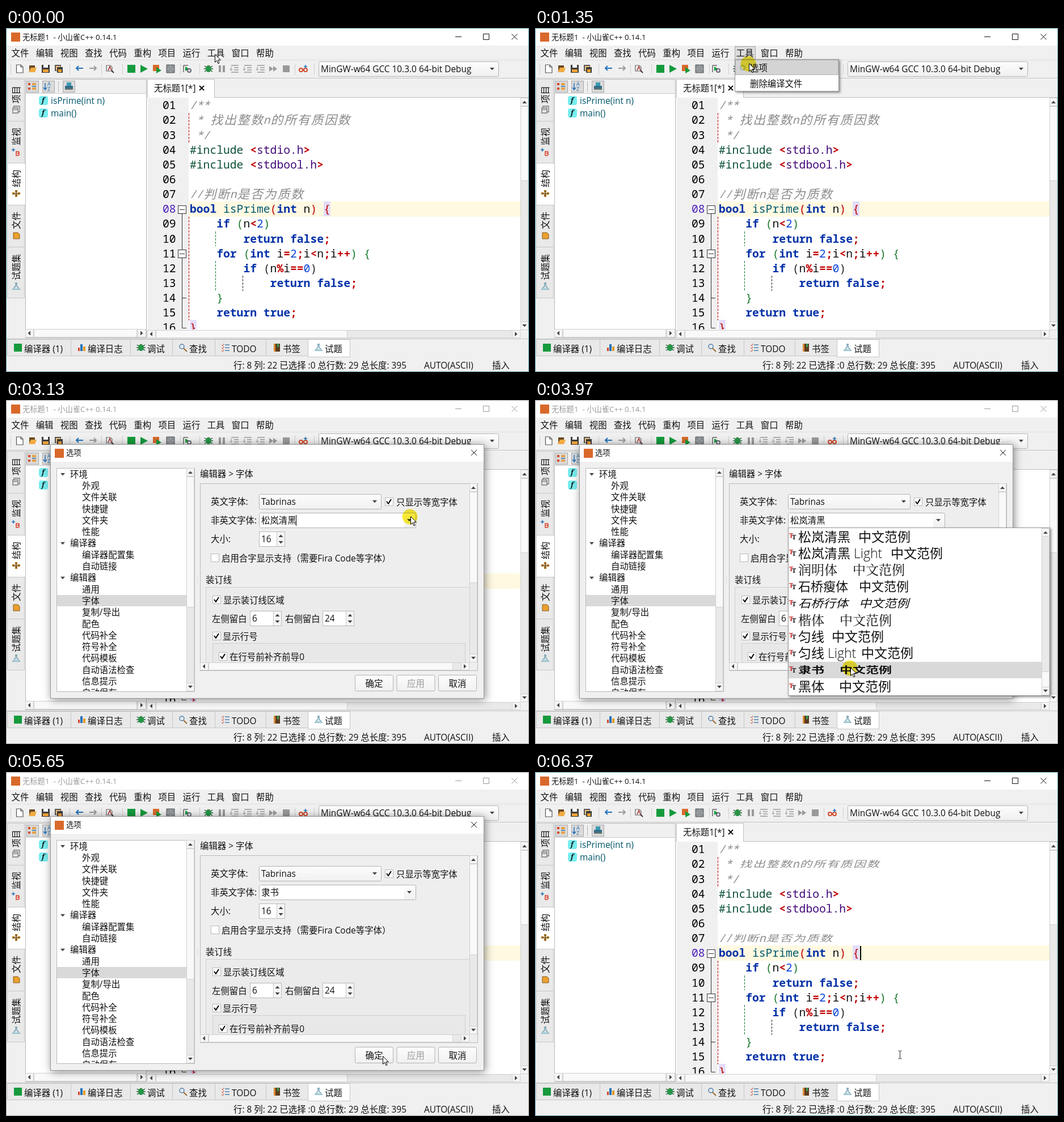
An HTML page with a canvas for the animation above (8440 ms loop, 922 by 607 pixels).

```html
<!DOCTYPE html>
<html lang="zh-CN">
<head>
<meta charset="utf-8">
<title>选项</title>
<style>
html, body { margin: 0; width: 100%; height: 100%; overflow: hidden; background: #f0f0f0; }
canvas { display: block; }
</style>
</head>
<body>
<canvas id="stage" width="922" height="607"></canvas>
<script>
const ctx = document.getElementById('stage').getContext('2d');
const LOOP = 8440;
const UI = '"Open Sans","Noto Sans CJK SC","Noto Sans CJK",sans-serif';
const MONO = '"Noto Sans Mono","Noto Sans CJK SC","Noto Sans CJK",monospace';
const SERIF = '"Noto Serif","Noto Serif CJK SC","Noto Sans CJK SC",serif';
const FACE = '#f0f0f0', EDGE = '#b9b9b9', INK = '#111', DIM = '#9a9a9a';
const ORANGE = '#d9692b', BLUE = '#2272b9', GREEN = '#159a3c';

// ---- drawing helpers ----
function fill(x, y, w, h, color) { ctx.fillStyle = color; ctx.fillRect(x, y, w, h); }
function frame(x, y, w, h, color = EDGE) {
  ctx.strokeStyle = color; ctx.lineWidth = 1;
  ctx.strokeRect(x + .5, y + .5, w - 1, h - 1);
}
function box(x, y, w, h, color = '#fff', edge = EDGE) { fill(x, y, w, h, color); frame(x, y, w, h, edge); }
function text(s, x, cy, { size = 15.4, color = INK, style = '', font = UI, align = 'left', squash = 1 } = {}) {
  ctx.save();
  ctx.translate(x, cy);
  ctx.scale(1, squash);
  ctx.font = `${style} ${size}px ${font}`;
  ctx.fillStyle = color;
  ctx.textAlign = align;
  ctx.fillText(s, 0, size * .37);
  ctx.restore();
}
// Each part is [path, color, line width]; without a width it is filled.
function shape(x, y, ...parts) {
  ctx.save();
  ctx.translate(x, y);
  for (const [d, color, width] of parts) {
    const path = new Path2D(d);
    if (width) { ctx.strokeStyle = color; ctx.lineWidth = width; ctx.stroke(path); }
    else { ctx.fillStyle = color; ctx.fill(path); }
  }
  ctx.restore();
}
function clipped(x, y, w, h, draw) {
  ctx.save();
  ctx.beginPath(); ctx.rect(x, y, w, h); ctx.clip();
  draw();
  ctx.restore();
}
function arrow(x, y, dir = 'down', color = '#444') {
  const turn = { down: 0, left: 1, up: 2, right: 3 }[dir];
  ctx.save();
  ctx.translate(x, y); ctx.rotate(turn * Math.PI / 2);
  shape(0, 0, ['M-4-2H4L0 2.5Z', color]);
  ctx.restore();
}
function cross(x, y, r, color = INK, width = 1) { shape(x, y, [`M${-r} ${-r}L${r} ${r}M${r} ${-r}L${-r} ${r}`, color, width]); }
function button(x, y, w, h) {
  const shade = ctx.createLinearGradient(0, y, 0, y + h);
  shade.addColorStop(0, '#fdfdfd'); shade.addColorStop(1, '#f0f0f0');
  ctx.beginPath(); ctx.roundRect(x + .5, y + .5, w - 1, h - 1, 2);
  ctx.fillStyle = shade; ctx.fill();
  ctx.strokeStyle = '#b3b3b3'; ctx.lineWidth = 1; ctx.stroke();
}
function combo(x, y, w, label, editable) {
  button(x, y, w, 27);
  if (editable) fill(x + 1, y + 1, w - 22, 25, '#fff');
  text(label, x + 4, y + 13.5);
  arrow(x + w - 12, y + 13);
}
function spin(x, y, w, value) {
  box(x, y, w, 27);
  fill(x + w - 15, y + 1, 14, 25, '#f5f5f5');
  fill(x + w - 15, y + 1, 1, 25, '#c8c8c8');
  text(value, x + 4, y + 13.5);
  arrow(x + w - 7.5, y + 8, 'up'); arrow(x + w - 7.5, y + 19);
}
function check(x, cy, label, on, gap = 19) {
  box(x, cy - 7, 15, 15);
  if (on) shape(x + 7, cy, ['M-4 0L-1 4L4-4', '#000', 2]);
  text(label, x + gap, cy + 1);
}
// The thumb covers the given span along the bar.
function scrollbar(x, y, w, h, from, to) {
  box(x, y, w, h, '#e9e9e9', '#d0d0d0');
  if (h > w) {
    box(x, y, w, 15, '#f6f6f6', '#d0d0d0'); box(x, y + h - 15, w, 15, '#f6f6f6', '#d0d0d0');
    box(x, from, w, to - from, '#f9f9f9', '#d0d0d0');
    arrow(x + w / 2, y + 8, 'up'); arrow(x + w / 2, y + h - 8);
  } else {
    box(x, y, 15, h, '#f6f6f6', '#d0d0d0'); box(x + w - 15, y, 15, h, '#f6f6f6', '#d0d0d0');
    box(from, y, to - from, h, '#f9f9f9', '#d0d0d0');
    arrow(x + 7, y + h / 2, 'left'); arrow(x + w - 8, y + h / 2, 'right');
  }
}

// ---- icons ----
const square = r => `M${-r} ${-r}H${r}V${r}H${-r}Z`;
const icons = {
  page: [['M-5.5-7H2L6-3V7H-5.5Z', '#fff'], ['M-5.5-7H2L6-3V7H-5.5ZM2-7V-3H6', '#555', 1.2]],
  folder: [['M-6-6H4V5H-6Z', '#6b4a22'], ['M-7 6L-3-2H7L4 6Z', '#f1ab43']],
  disk: [[square(7), '#3d3d3d'], ['M-4-7H4V-2H-4Z', '#fff'], ['M-5 1H5V6H-5Z', '#efa135']],
  disks: [['M-7-7H4V4H-7Z', '#555'], ['M-5-5H3V3H-5Z', '#f3c47f'], ['M-3-3H7V7H-3Z', '#3d3d3d'], ['M-1 1H5V6H-1Z', '#efa135']],
  undo: [['M-6-1H6M-2-5L-6-1L-2 3', BLUE, 2]],
  redo: [['M-6-1H6M2-5L6-1L2 3', '#999', 2]],
  find: [['M-6-6H1L4-3V4H-6Z', '#666', 1.2], ['M-3 3L0-4L3 3', '#a33', 1.5], ['M3 3L7 7', '#333', 2]],
  build: [[square(7), GREEN]],
  run: [['M-6-7L7 0L-6 7Z', GREEN]],
  buildRun: [['M-7-7H4V4H-7Z', ORANGE], ['M-1-3L8 3L-1 8Z', GREEN]],
  rebuild: [['M-7-7H-1V-1H-7ZM1-7H7V-1H1ZM-7 1H-1V7H-7ZM1 1H7V7H1Z', '#8b9298'], ['M-7-7H7V7H-7ZM0-7V7M-7 0H7', '#555', 1]],
  gearRun: [['M-6-6V6M-6-6H2', '#666', 1.5], ['M-3-4L4 0L-3 4Z', GREEN], ['M1 3A3 3 0 1 0 7 3A3 3 0 1 0 1 3', '#667', 2]],
  bug: [['M-7-5L7 5M7-5L-7 5M-8 0H8', '#245c38', 1.5], ['M-4-3Q0-10 4-3Z', '#c6512a'], ['M-5 0A5 6 0 1 0 5 0A5 6 0 1 0-5 0', '#269447']],
  pause: [['M-5-6H-1V6H-5ZM2-6H6V6H2Z', '#999']],
  step: [['M-6-6H7M-1-2H7M-1 2H7M-6 6H7', '#999', 1.7], ['M-6-4V2M-8 0L-6 3L-4 0', '#999', 1]],
  forward: [['M-7-5L0 0L-7 5ZM0-5L7 0L0 5Z', '#999']],
  stop: [[square(6), '#999']],
  watch: [['M-7 2A3 3 0 1 0-1 2A3 3 0 1 0-7 2M1 2A3 3 0 1 0 7 2A3 3 0 1 0 1 2', '#d24a2c', 2], ['M4-7V-1M1-4H7', BLUE, 1.5]],
  chart: [['M-6 0H-3V6H-6Z', '#d9442b'], ['M-2-6H2V6H-2Z', BLUE], ['M3-2H7V6H3Z', '#e59a22']],
  lens: [['M-6-2A4 4 0 1 0 2-2A4 4 0 1 0-6-2', '#4a83b0', 1.5], ['M1 1L7 7', '#a0682f', 2]],
  todo: [['M-1-5H7M-1 0H7M-1 5H7', '#4a83b0', 1.5], ['M-7-5L-5-3L-3-7M-7 0L-5 2L-3-2M-7 5L-5 7L-3 3', '#cc4a30', 1]],
  book: [['M-5-7H6V7H-5Z', '#5b3b20'], ['M-5-7H-2V7H-5Z', '#d98b31'], ['M1-7H4V0L2.5-1.5L1 0Z', '#3aa054']],
  flask: [['M-2-6H2M-1-6V-1L-6 5H6L1-1V-6', '#6f9eae', 1.4], ['M-3 2H3L6 5H-6Z', '#b3d7df']],
  stack: [['M-6-3H3V6H-6ZM-4-3V-6H6V4H3', '#777', 1.3], ['M-6 0H3', '#777', 1.3]],
  plusB: [['M0 0H4Q7 2 3 3Q8 5 3 7H0Z', '#d9442b', 1.6], ['M-5-6V0M-8-3H-2', BLUE, 1.5]],
  nodes: [['M-7-2H-3V2H-7ZM-2-6H2V-2H-2ZM-2 1H2V6H-2ZM3-2H7V2H3Z', '#b37b22'], ['M-5 0H5M0-5V5', '#70501e', 1.3]],
  sheet: [['M-5-5H3L6-2V6H-5Z', '#e9a02f'], ['M-5-5H3L6-2V6H-5Z', '#8b5b1d', 1]],
  gear: [['M-4 0A4 4 0 1 0 4 0A4 4 0 1 0-4 0', '#9db0b2', 2]]
};
const icon = (name, x, y) => shape(x, y, ...icons[name]);

// ---- main window ----
const TOOLBAR = [
  ['page', 24], ['folder', 47], ['disk', 70], ['disks', 93], ['undo', 130], ['redo', 153], ['find', 183],
  ['build', 221], ['run', 243], ['buildRun', 266], ['rebuild', 290], ['gearRun', 319], ['bug', 357],
  ['pause', 380], ['step', 403], ['step', 426], ['step', 449], ['forward', 471], ['stop', 494], ['watch', 524]
];
const SIDE_TABS = [['项目', 90, 74, 'stack'], ['监视', 164, 74, 'plusB'], ['结构', 238, 74, 'nodes'], ['文件', 312, 74, 'sheet'], ['试题集', 386, 90, 'flask']];
const BOTTOM_TABS = [
  ['编译器 (1)', 2, 112, 'build'], ['编译日志', 114, 105, 'chart'], ['调试', 219, 74, 'bug'], ['查找', 293, 75, 'lens'],
  ['TODO', 368, 90, 'todo'], ['书签', 458, 74, 'book'], ['试题', 532, 74, 'flask']
];

function drawTitle(active) {
  const color = active ? INK : DIM;
  fill(0, 0, 922, 31, '#fff');
  fill(9, 8, 16, 16, ORANGE);
  text('无标题1  - 小山雀C++ 0.14.1', 29, 16, { size: 13.3, color });
  shape(0, 0, ['M792 15.5H803M841.5 10.5H851.5V20.5H841.5Z', color, 1]);
  cross(896.5, 15.5, 5, color);
}
function drawMenuBar(open) {
  if (open) box(352, 32, 37, 24, '#dcdcdc', '#a8a8a8');
  '文件 编辑 视图 查找 代码 重构 项目 运行 工具 窗口 帮助'.split(' ')
    .forEach((s, i) => text(s, 9.5 + 43.15 * i, 44));
}
function drawToolbar() {
  fill(0, 56, 922, 1, '#dedede');
  fill(0, 88, 922, 1, '#c4c4c4');
  for (const x of [8, 112, 168, 205, 307, 341, 509, 543]) fill(x, 63, 1, 19, '#cfcfcf');
  for (const [name, x] of TOOLBAR) icon(name, x, 72);
  combo(551, 59, 318, 'MinGW-w64 GCC 10.3.0 64-bit Debug');
}
function drawSide() {
  for (const [label, y, h, name] of SIDE_TABS) {
    const selected = label === '结构';
    box(2, y, selected ? 33 : 31, h + 1, selected ? '#fff' : '#e9e9e9', '#c6c6c6');
    icon(name, 18, y + h - 20);
    ctx.save();
    ctx.translate(18, y + h - 31); ctx.rotate(-Math.PI / 2);
    text(label, 0, 0);
    ctx.restore();
  }
  box(34, 90, 214, 457, '#fff');
  fill(35, 91, 212, 25, FACE); fill(35, 115, 212, 1, '#c8c8c8');
  for (const x of [36, 64, 100]) box(x, 93, 22, 21, '#dadada', '#aaa');
  fill(92, 94, 1, 19, '#b5b5b5');
  shape(47, 103, ['M-8-6H-4V-2H-8ZM-8 2H-4V6H-8Z', '#d64b2b'], ['M-1-6H6V-2H-1ZM-1 2H6V6H-1Z', '#e8a04a'], ['M-1 0H6', BLUE, 1.5]);
  shape(69, 103, ['M0-6V5M-3 2L0 6L3 2', BLUE, 1.5]);
  text('A', 73, 99, { size: 9, color: BLUE }); text('Z', 73, 108, { size: 9, color: BLUE });
  shape(111, 102, ['M-7 0H7V5H-7Z', '#356f86'], ['M-4-6H4V0H-4Z', '#3b9ab3'], ['M-7 6H7', '#555', 1.5]);
  ['isPrime(int n)', 'main()'].forEach((s, i) => {
    const y = 128 + 22 * i;
    ctx.beginPath(); ctx.roundRect(58, y - 8, 16, 16, 4); ctx.fillStyle = '#78edf0'; ctx.fill();
    text('f', 63, y, { size: 12, style: 'italic bold', font: SERIF });
    text(s, 79, y, { color: '#00556b' });
  });
  scrollbar(34, 531, 213, 15, 49, 231);
}
function drawBottom() {
  fill(0, 548, 922, 1, '#c4c4c4');
  for (const [label, x, w, name] of BOTTOM_TABS) {
    const selected = label === '试题';
    box(x, 549, w + 1, selected ? 32 : 30, selected ? '#fff' : '#e9e9e9', '#c6c6c6');
    icon(name, x + 19, 564);
    text(label, x + 30, 566);
  }
  text('行: 8 列: 22 已选择 :0 总行数: 29 总长度: 395', 401, 595);
  text('AUTO(ASCII)', 737, 595);
  text('插入', 857, 595);
}

// ---- code editor ----
const CODE = `/**
 * 找出整数n的所有质因数
 */
#include <stdio.h>
#include <stdbool.h>

//判断n是否为质数
bool isPrime(int n) {
    if (n<2)
        return false;
    for (int i=2;i<n;i++) {
        if (n%i==0)
            return false;
    }
    return true;
}`.split('\n');
const COL = 11.8, CODE_SIZE = COL / .6, CODE_X = 324;
const rowY = line => 136 + 26.14 * (line - 1);
const LEVELS = ['#c00000', '#187a2c', '#222'];

function drawComment(line, y, clerical) {
  let x = CODE_X;
  for (const ch of line) {
    const wide = ch > '\u2fff';
    text(ch, wide ? x + 1 : x, y, {
      size: wide ? 21.8 : CODE_SIZE, color: '#8c8c8c', font: MONO,
      style: wide && clerical ? 'italic 500' : 'italic', squash: wide && clerical ? .72 : 1
    });
    x += wide ? 2 * COL : COL;
  }
}
function drawCode(clerical) {
  let depth = 0;
  CODE.forEach((line, i) => {
    const y = rowY(i + 1);
    text(String(i + 1).padStart(2, '0'), 276, y, { size: CODE_SIZE, font: MONO, color: i === 7 ? '#4a22b8' : '#000' });
    if (/^(\/| \*)/.test(line)) return drawComment(line, y, clerical);
    for (const { 0: token, index } of line.matchAll(/#include|[a-z]\w*(\.h)?|\d+|[^\s\w]/gi)) {
      const x = CODE_X + index * COL;
      let color = '#c00000', style = 'bold';
      if (/[(){}]/.test(token)) {
        if (/[)}]/.test(token)) depth--;
        color = LEVELS[depth]; style = '';
        if (/[{}]/.test(token) && depth === 0) fill(x, y - 13, COL, 26, '#e3dcfa');
        if (/[({]/.test(token)) depth++;
      } else if (/^(bool|int|if|for|return|true|false)$/.test(token)) color = '#0532a8';
      else if (/\w/.test(token)) {
        style = '';
        color = token === '#include' ? '#0c5136' : token.endsWith('.h') ? '#420a78' : token === 'isPrime' ? '#005a70' : /\d/.test(token) ? '#0b46d8' : '#111';
      }
      text(token, x, y, { size: CODE_SIZE, font: MONO, style, color });
    }
  });
}
function drawGuides() {
  ctx.setLineDash([4, 2]);
  shape(0, 0,
    ['M322.5 150V202M322.5 333V516', '#c00000', 1],
    ['M369.5 359V385M369.5 411V464', '#187a2c', 1],
    ['M417.5 437V464', '#222', 1]);
  ctx.setLineDash([]);
  shape(0, 0, ['M310.5 320V529.5H318M310.5 476.5H318', '#333', 1]);
  for (const line of [8, 11]) {
    const y = Math.round(rowY(line));
    box(303, y - 6, 15, 15, '#fff', '#333');
    fill(306, y + 1, 9, 1, '#333');
  }
}
function drawEditor(clerical) {
  box(249, 90, 119, 34, '#fff', '#c0c0c0');
  text('无标题1[*]', 261, 106);
  cross(345, 106, 4, INK, 2);
  fill(367, 122, 555, 1, '#c0c0c0');
  fill(249, 123, 658, 410, '#fff');
  fill(250, 123, 72, 410, FACE);
  fill(322, 306, 585, 27, '#fff9e1');
  clipped(249, 123, 658, 409, () => {
    drawCode(clerical);
    drawGuides();
    if (clerical) fill(573, 307, 2, 25, '#000');
  });
  scrollbar(907, 123, 14, 410, 138, 270);
  scrollbar(249, 533, 658, 14, 264, 602);
}
function drawWindow(active, menuOpen, clerical) {
  fill(0, 0, 922, 607, FACE);
  drawTitle(active);
  drawMenuBar(menuOpen);
  drawToolbar();
  drawSide();
  drawEditor(clerical);
  drawBottom();
  frame(0, 0, 922, 607, active ? '#4f93a8' : '#999');
}
function raised(x, y, w, h, color, blur) {
  ctx.save();
  ctx.shadowColor = 'rgba(0,0,0,.45)'; ctx.shadowBlur = blur; ctx.shadowOffsetX = ctx.shadowOffsetY = 2;
  fill(x, y, w, h, color);
  ctx.restore();
  frame(x, y, w, h, '#999');
}
function drawMenu(hover) {
  raised(352, 55, 184, 57, '#fff', 4);
  if (hover) box(353, 56, 182, 27, '#d4d4d4', '#b4b4b4');
  icon('gear', 366, 70);
  text('选项', 379, 70);
  text('删除编译文件', 379, 98);
}

// ---- options dialog ----
const OPTIONS = ['+环境', '外观', '文件关联', '快捷键', '文件夹', '性能', '+编译器', '编译器配置集', '自动链接', '+编辑器',
  '通用', '字体', '复制/导出', '配色', '代码补全', '符号补全', '代码模板', '自动语法检查', '信息提示', '自动保存'];
const SANS_NAME = '松岚清黑';
// Font name, sample position, text style
const FONTS = [
  [SANS_NAME, 570, { style: '500' }], [SANS_NAME + ' Light', 627, { style: '300' }], ['润明体', 560, { font: SERIF }],
  ['石桥瘦体', 571, { style: '500', size: 22 }], ['石桥行体', 571, { style: 'italic 500', size: 22, squash: .9 }],
  ['楷体', 537, { font: SERIF }], ['匀线', 523, {}], ['匀线 Light', 575, { style: '300' }],
  ['隶书', 537, { style: 'bold', squash: .7 }], ['黑体', 536, { style: '500' }]
];

function drawTree(selected) {
  box(89, 120, 244, 395);
  clipped(90, 121, 228, 393, () => {
    if (selected) fill(90, 344, 228, 20, '#d9d9d9');
    OPTIONS.forEach((s, i) => {
      const y = 131 + 20.3 * i;
      if (s[0] === '+') { arrow(100, y); text(s.slice(1), 113, y); }
      else text(s, 134, y);
    });
  });
  scrollbar(318, 120, 14, 394, 135, 366);
}
function drawLookPage() {
  text('环境 > 外观', 342, 130);
  box(342, 147, 490, 331, '#eeeeee');
  ['主题:', '字体:', '大小:', '图标集:', '语言:'].forEach((s, i) => text(s, 351, 170 + 33.1 * i));
  combo(418, 157, 119, '浅色主题'); check(543, 169, '使用自定义主题', false, 20);
  combo(418, 190, 277, SANS_NAME);
  spin(418, 223, 46, '11');
  combo(418, 256, 73, '新外观'); check(497, 269, '使用自定义图标', false);
  combo(418, 289, 89, '简体中文');
  text('*需要重启之后生效', 513, 302);
}
function drawFontPage(fontName, caretX) {
  text('编辑器 > 字体', 342, 130);
  box(342, 147, 490, 331, '#eeeeee');
  text('英文字体:', 361, 179); combo(446, 166, 216, 'Tabrinas'); check(668, 179, '只显示等宽字体', true, 20);
  text('非英文字体:', 361, 212); combo(446, 199, 277, fontName, true);
  if (caretX) fill(caretX, 203, 1, 19, '#000');
  text('大小:', 361, 245); spin(446, 232, 46, '16');
  check(361, 278, '启用合字显示支持（需要Fira Code等字体）', false);
  text('装订线', 352, 317);
  clipped(343, 320, 474, 143, () => {
    box(352, 330, 480, 200, '#ebebeb', '#d0d0d0');
    check(364, 352, '显示装订线区域', true);
    text('左侧留白', 363, 386); spin(430, 372, 56, '6');
    text('右侧留白', 492, 386); spin(558, 372, 56, '24');
    check(364, 416, '显示行号', true, 18);
    box(364, 429, 446, 80, '#e8e8e8', '#d0d0d0');
    check(375, 452, '在行号前补齐前导0', true);
  });
  scrollbar(817, 147, 14, 316, 162, 323);
  scrollbar(342, 463, 475, 14, 357, 788);
}
function drawDialog(t) {
  const chosen = t >= 4240;
  raised(78, 78, 765, 449, FACE, 14);
  fill(79, 79, 763, 30, '#fff');
  fill(86, 86, 16, 16, ORANGE);
  text('选项', 106, 93, { size: 13.3 });
  cross(825, 93, 5);
  drawTree(t >= 2190);
  for (let y = 311; y < 326; y += 4) fill(337, y, 1, 1, '#aaa');
  if (t < 2460) drawLookPage();
  else drawFontPage(chosen ? '隶书' : SANS_NAME, t >= 3130 && t < 3400 ? 511 : chosen && t < 4810 ? 481 : 0);
  const canApply = t >= 4810 && t < 5380;
  ['确定', '应用', '取消'].forEach((s, i) => {
    button(615 + 73.5 * i, 485, 68, 29);
    text(s, 649 + 73.5 * i, 500, { align: 'center', color: i === 1 && !canApply ? DIM : INK });
  });
}
function drawFontList() {
  raised(446, 225, 462, 297, '#fff', 4);
  fill(447, 462, 446, 29, '#d9d9d9');
  FONTS.forEach(([name, sampleX, look], i) => {
    const y = 241 + 29.4 * i, opts = { size: 23, ...look };
    text('T', 448, y - 2, { size: 11, style: 'bold', font: SERIF, color: '#c22' });
    text('T', 453, y + 1, { size: 11, style: 'bold', font: SERIF });
    text(name, 464, y, opts);
    text('中文范例', sampleX, y, opts);
  });
  scrollbar(893, 226, 14, 295, 479, 507);
}

// ---- pointer ----
const STOPS = [[0, 368, 46], [880, 377, 62], [2190, 156, 353], [3130, 713, 205], [3400, 556, 472], [4810, 698, 502], [5650, 664, 501]];
const CLICKS = [[470, 610], [1350, 1620], [2190, 2460], [3130, 3400], [3970, 4240], [4810, 5380]];

function drawPointer(t) {
  if (t >= 6370) return shape(643.5, 499, ['M-3-7H-1L0-6L1-7H3M0-6V6M-3 7H-1L0 6L1 7H3', '#222', 1]);
  const [, x, y] = STOPS.findLast(stop => t >= stop[0]);
  if (CLICKS.some(([from, to]) => t >= from && t < to)) {
    ctx.globalCompositeOperation = 'multiply';
    shape(x - 1, y + 1, ['M-13.5 0A13.5 13.5 0 1 0 13.5 0A13.5 13.5 0 1 0-13.5 0', '#fbec3a']);
    ctx.globalCompositeOperation = 'source-over';
  }
  const outline = 'M.5.5V14.5L3.7 11.4L6 16.8L8 15.9L5.8 10.6H10.3Z';
  shape(x, y, [outline, '#fff'], [outline, '#000', 1]);
}

function draw(t) {
  const inDialog = t >= 1620 && t < 6230;
  const menuAlpha = t < 470 || t >= 1620 ? 0 : t < 540 ? .35 : t < 610 ? .7 : 1;
  const dialogAlpha = t < 1620 || t >= 6370 ? 0 : t < 6230 ? 1 : t < 6300 ? .6 : .25;
  drawWindow(!inDialog, menuAlpha > 0, t >= 6230);
  if (menuAlpha) {
    ctx.globalAlpha = menuAlpha;
    drawMenu(t >= 880);
    ctx.globalAlpha = 1;
  }
  if (dialogAlpha) {
    ctx.save();
    ctx.globalAlpha = dialogAlpha;
    if (!inDialog) {
      const scale = .9 + .1 * dialogAlpha;
      ctx.translate(460, 302); ctx.scale(scale, scale); ctx.translate(-460, -302);
    }
    drawDialog(t);
    ctx.restore();
  }
  if (t >= 3400 && t < 4240) drawFontList();
  drawPointer(t);
}

const start = performance.now();
function tick() {
  draw((performance.now() - start) % LOOP);
  requestAnimationFrame(tick);
}
tick();
</script>
</body>
</html>
```
